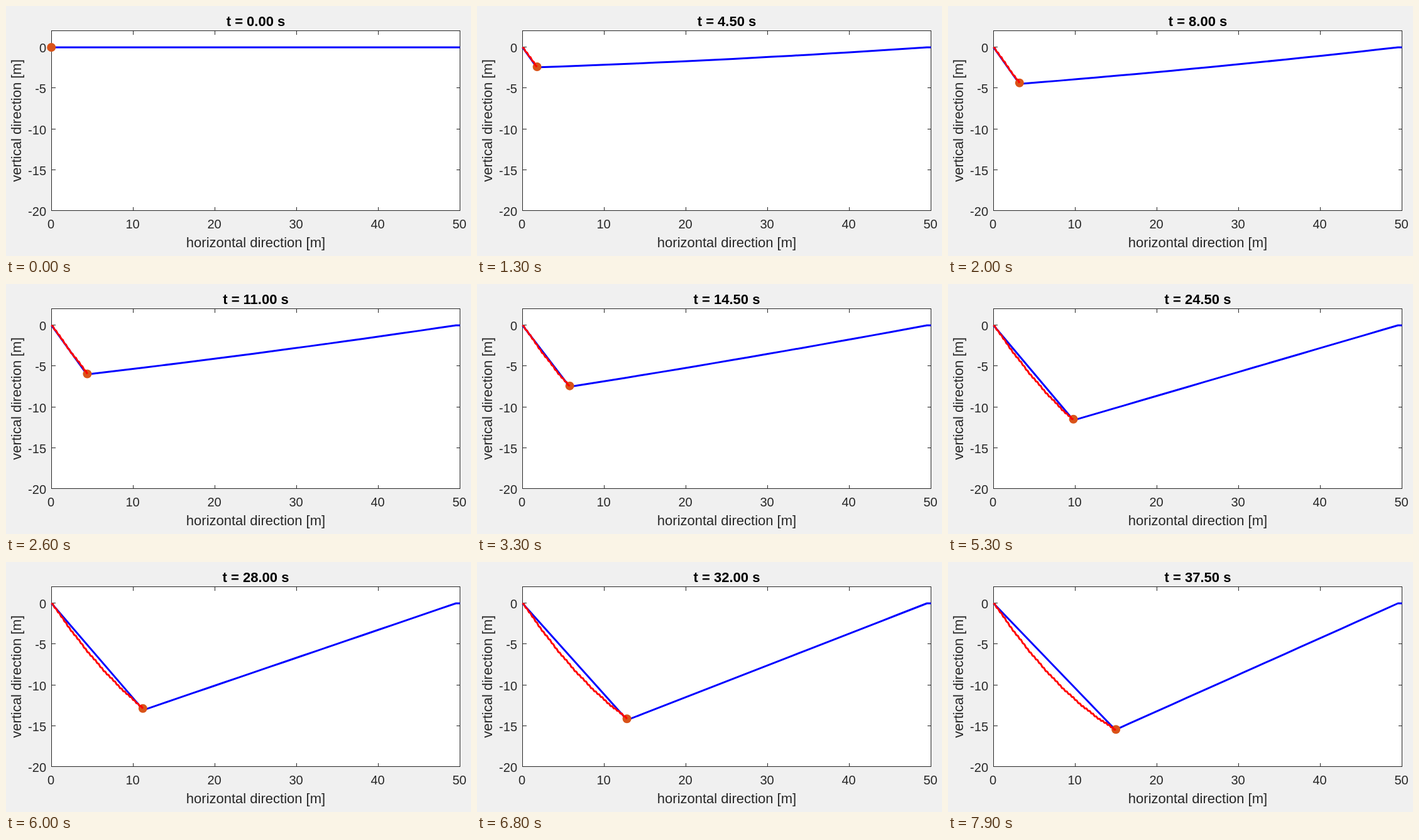
Recreate the animation shown at these times as an HTML page. Size 740x399 px, loop 8 s.

```html
<!DOCTYPE html>
<html lang="en">
<head>
<meta charset="utf-8">
<title>Mass moving along a cable</title>
<style>
  html, body { margin: 0; width: 100%; height: 100%; overflow: hidden; background: #f0f0f0; }
  svg { display: block; width: 740px; height: 399px; }
  text { font: 20px "Liberation Sans", Arial, sans-serif; fill: #262626; text-anchor: middle; }
  .label { font-size: 22px; }
  #title { font-size: 22px; font-weight: bold; fill: #000; }
  #yTicks text { text-anchor: end; }
  #axes { fill: none; stroke: #262626; shape-rendering: crispEdges; }
  .curve { fill: none; stroke-width: 3; stroke-linejoin: round; }
</style>
</head>
<body>
<svg viewBox="0 0 740 399">
  <rect x="72" y="39" width="651" height="288" fill="#fff"/>
  <path id="axes"/>
  <g id="xTicks"></g>
  <g id="yTicks"></g>
  <text id="title" x="397.5" y="32"></text>
  <text class="label" x="397.5" y="385">horizontal direction [m]</text>
  <text class="label" transform="translate(24 183) rotate(-90)">vertical direction [m]</text>
  <polyline id="cable" class="curve" stroke="#00f"/>
  <circle id="mass" r="7" fill="#d95319"/>
  <polyline id="trail" class="curve" stroke="#f00"/>
</svg>
<script>
const LOOP = 8000, HOLD = 400, STEP = 100;
const LEFT = 72.5, RIGHT = 722.5, TOP = 39.5, BOTTOM = 326.5;
const REST = 66, NODE = 6.5, ANCHOR = RIGHT - NODE, TICK = 6;
const $ = id => document.getElementById(id);

// Position of the mass after i half-second steps: a flattening descent
// with a slow swing and a fast up-and-down shake.
function massAt(i) {
  const x = LEFT - 0.3 + 2.6 * i;
  if (!i) return [x, REST];
  const descent = 3.9 * i - 0.0158 * i * i - 2;
  const swing = 0.5 * Math.cos(2 * Math.PI * (i - 22) / 10.5);
  const shake = 0.9 * Math.cos(Math.PI * i);
  return [x, REST + descent + swing + shake];
}

function addText(group, x, y, value) {
  const text = document.createElementNS("http://www.w3.org/2000/svg", "text");
  text.setAttribute("x", x);
  text.setAttribute("y", y);
  text.textContent = value;
  $(group).append(text);
}

function drawAxes() {
  let d = `M${LEFT} ${TOP}H${RIGHT}V${BOTTOM}H${LEFT}Z`;
  for (let v = 0; v <= 50; v += 10) {
    const x = LEFT + 13 * v;
    d += `M${x} ${TOP}v${TICK}M${x} ${BOTTOM}v-${TICK}`;
    addText("xTicks", x - 1, 355, v);
  }
  for (let v = 0; v >= -20; v -= 5) {
    const y = Math.floor(65.6 - 13.045 * v) + 0.5;
    d += `M${LEFT} ${y}h${TICK}M${RIGHT} ${y}h-${TICK}`;
    addText("yTicks", 64, y + 8, v);
  }
  $("axes").setAttribute("d", d);
}

// The cable bends only at evenly spaced nodes; the mass hangs between two of them.
function cablePoints(i) {
  const start = [LEFT, REST], end = [RIGHT, REST];
  if (!i) return [start, end];
  const [x, y] = massAt(i);
  const tipX = LEFT + NODE * Math.ceil((x - LEFT) / NODE);
  const tipY = y + 0.3 * (tipX - x);
  const points = [start];
  const nearX = tipX - NODE;
  if (nearX > LEFT) {
    points.push([nearX, REST + (y - REST) * (nearX - LEFT) / (x - LEFT) + 1.5]);
  }
  points.push([x, y], [tipX, tipY]);
  // The long side sags slightly until the cable pulls taut
  const sag = 2.5 * Math.min(1, i / 4) * Math.max(0, 1 - (i / 48) ** 3);
  for (let k = 1; k <= 20; k++) {
    const u = k / 20;
    points.push([tipX + (ANCHOR - tipX) * u, tipY + (REST - tipY) * u + 4 * sag * u * (1 - u)]);
  }
  return [...points, end];
}

function draw(now) {
  const i = Math.max(0, Math.floor((now % LOOP - HOLD) / STEP));
  const [x, y] = massAt(i);
  const trail = Array.from({ length: i + 1 }, (_, k) => massAt(k));
  $("title").textContent = `t = ${(i / 2).toFixed(2)} s`;
  $("cable").setAttribute("points", cablePoints(i).join(" "));
  $("trail").setAttribute("points", trail.join(" "));
  $("mass").setAttribute("cx", x);
  $("mass").setAttribute("cy", y);
}

function frame(now) {
  draw(now);
  requestAnimationFrame(frame);
}

drawAxes();
draw(0);
requestAnimationFrame(frame);
</script>
</body>
</html>
```
